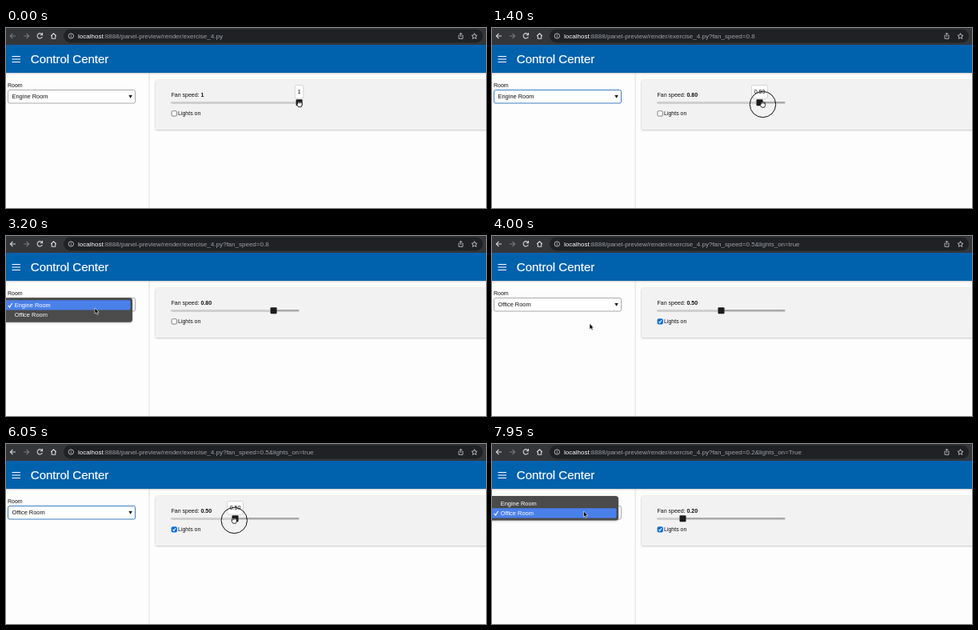
Recreate the animation shown at these times as an HTML page. Size 600 by 225 pixels, loop 8000 ms.

```html
<!DOCTYPE html>
<html lang="en">
<head>
<meta charset="utf-8">
<title>Control Center</title>
<style>
  html, body { margin: 0; width: 100%; height: 100%; overflow: hidden; background: #fdfdfd; }
  svg { display: block; width: 100vw; height: 100vh; }
  text { font: 7px "Liberation Sans", Arial, sans-serif; fill: #111; white-space: pre; }
  .url { font-size: 8.03px; fill: #9aa0a6; }
  .host { fill: #fff; }
  .title { font-size: 15px; fill: #fff; stroke: #fff; stroke-width: 0.2; }
  .choice { font-size: 7.45px; }
  .menu text { font-size: 7.45px; fill: #fff; }
  .bold { font-weight: bold; }
  .icon { fill: none; stroke: #d3d5d9; stroke-width: 1.1; }
  .thin { stroke-width: 0.8; }
  .off { stroke: #77797d; }
</style>
</head>
<body>
<svg viewBox="0 0 600 225" preserveAspectRatio="none">
  <defs>
    <filter id="shadow" x="-5%" y="-20%" width="110%" height="150%">
      <feDropShadow dx="0" dy="0.6" stdDeviation="0.9" flood-opacity="0.28"/>
    </filter>
  </defs>
  <rect width="600" height="225" fill="#fdfdfd"/>

  <!-- page -->
  <path d="M179 56V225" stroke="#dedede"/>
  <rect x="187" y="65" width="420" height="62" rx="2" fill="#f2f2f2" filter="url(#shadow)"/>
  <rect x="-5" y="20" width="610" height="36" fill="#0062ac" filter="url(#shadow)"/>
  <path d="M7.5 35.5H18M7.5 39H18M7.5 42.5H18" stroke="#fff" stroke-width="1.1"/>
  <text class="title" x="30.8" y="44.2">Control Center</text>

  <!-- browser bar -->
  <rect width="600" height="21" fill="#35363a"/>
  <rect x="72" y="1.5" width="524" height="17" rx="8.5" fill="#202124"/>
  <path class="icon" id="back" d="M12 10H5.5M8.5 6.8L5.3 10L8.5 13.2"/>
  <path class="icon off" d="M22 10H28.5M25.5 6.8L28.7 10L25.5 13.2"/>
  <path class="icon" d="M45 8A3.2 3.2 0 1 0 45.3 11M45.5 6V8.8H42.7"/>
  <path class="icon" d="M56.2 10L59.5 6.8L62.8 10M57.3 9.5V13.2H61.7V9.5"/>
  <g class="icon thin">
    <circle cx="81.3" cy="10" r="3.2"/><path d="M81.3 9.6V11.8M81.3 8V8.8"/>
    <path d="M567 9H566V13.3H571V9H570M568.5 11V6.3M566.8 7.8L568.5 6.1L570.2 7.8"/>
    <path d="M585.5 6.6L586.5 9L589 9.2L587.1 10.9L587.7 13.4L585.5 12L583.3 13.4L583.9 10.9L582 9.2L584.5 9Z"/>
  </g>
  <text class="url" x="90" y="13"><tspan class="host">localhost</tspan>:8888/panel-preview/render/exercise_4.py<tspan id="query"></tspan></text>

  <!-- room selector -->
  <text x="2" y="73.8">Room</text>
  <rect id="select" x="2.5" y="77.5" width="159" height="16.5" rx="2" fill="#fff" stroke-width="0.9"/>
  <text class="choice" id="room" x="7.5" y="88.3"></text>
  <path d="M153.4 83.9H157.8L155.6 87.7Z" fill="#111"/>

  <!-- controls -->
  <text x="206.5" y="85.6">Fan speed: <tspan class="bold" id="speed"></tspan></text>
  <rect x="206.5" y="92" width="160" height="2.4" rx="1" fill="#a9a9a9"/>
  <rect id="track" x="206.5" y="92" height="2.4" rx="1" fill="#d0d0d0"/>
  <rect id="knob" y="89.2" width="8" height="8" rx="1" fill="#1c1c1c"/>
  <rect id="box" x="207" y="103.7" width="6.4" height="6.4" rx="1.2" stroke-width="0.8"/>
  <path id="tick" d="M208.5 107L209.8 108.4L212 105.3" fill="none" stroke="#fff" stroke-width="1.1"/>
  <text x="215" y="109.3">Lights on</text>
  <g id="tip">
    <rect id="tipBox" y="71.5" height="16.5" rx="2" fill="#fff" stroke="#ccc" stroke-width="0.8"/>
    <text id="tipText" y="82" text-anchor="middle"></text>
  </g>

  <!-- drop-down list -->
  <g class="menu" id="menu">
    <rect x="-4" y="0" width="162" height="30.5" rx="3.5" fill="#4b4b4b" filter="url(#shadow)"/>
    <rect id="mark" x="-2" width="157.5" height="12.3" rx="2" fill="#4a80ea"/>
    <path id="check" d="M2.8 9.6L4.6 11.8L7.6 6.8" fill="none" stroke="#fff" stroke-width="1.1"/>
    <text x="10.7" y="11.8">Engine Room</text>
    <text x="10.7" y="24.1">Office Room</text>
  </g>

  <!-- pointer -->
  <g id="pointer">
    <circle id="ring" r="16.2" fill="none" stroke="#111"/>
    <path id="arrow" d="M0 0V7.2L1.7 5.7L2.9 8.3L4.2 7.7L3.1 5.2H5.2Z" fill="#000" stroke="#fff" stroke-width="0.6"/>
    <path id="hand" transform="scale(0.88)" d="M-2.6 -2.6Q-2 -3.6 -1.1 -2.9Q-.3 -3.9 .6 -3Q1.5 -3.7 2.2 -2.6Q3.5 -2.8 3.5 -1.4V1L2.5 4.2H-1.7L-3.6 1.2Q-4.3 -.6 -2.6 -.2ZM-.9 -2.6V-.9M.7 -2.6V-.9M2.2 -2.3V-.9" fill="#fff" stroke="#000" stroke-width="0.9"/>
  </g>
</svg>
<script>
const LOOP = 8000, STEP = 50, TRACK_X = 206.5, TRACK_W = 160, ROW_H = 12.3;
const ROOMS = ["Engine Room", "Office Room"];

const el = {};
document.querySelectorAll("[id]").forEach(node => el[node.id] = node);

const show = (node, on) => node.style.display = on ? "" : "none";
const set = (node, attrs) => Object.entries(attrs).forEach(([k, v]) => node.setAttribute(k, v));
const ease = k => k * k * (3 - 2 * k);
const valueAt = x => Math.round((x - TRACK_X) / TRACK_W * 10) / 10;

// Plays the story from the start and stops at the given time.
function stateAt(now) {
  const s = { x: 367, y: 95, speed: 1, lights: "", room: 0 };
  let clock = 0;

  const wait = ms => clock += ms;
  const change = props => { if (now >= clock) Object.assign(s, props); };
  const click = props => { change({ pressed: true }); wait(100); change({ pressed: false, ...props }); };

  // Eased move; sag bends the way downwards.
  function glide(ms, x, y, sag = 0) {
    if (now >= clock) {
      const k = ease(Math.min(1, (now - clock) / ms));
      s.x += (x - s.x) * k;
      s.y += (y - s.y) * k + sag * Math.sin(Math.PI * k);
    }
    clock += ms;
  }

  function drag(x) {
    const begin = clock, before = s.speed;
    glide(700, x, 95.5);
    if (now < begin) return;
    s.speed = valueAt(s.x);
    if (s.lights && s.speed !== before) s.lights = "True";
  }

  wait(400);
  change({ pressed: true, focus: true });
  wait(250);
  drag(338.5);
  wait(350);
  change({ pressed: false });

  glide(1050, 111, 90, 50);
  click({ focus: false, open: true });
  wait(500);
  glide(150, 112, 102.5);
  click({ open: false, room: 1, speed: 0.5, lights: "true" });
  glide(300, 122, 109.5);
  wait(350);

  glide(500, 338, 118, 25);
  glide(300, 289, 97);
  wait(50);
  glide(200, 288, 95.5);
  wait(400);
  change({ pressed: true, focus: true });
  wait(250);
  drag(238.5);
  wait(150);
  change({ pressed: false });

  glide(900, 114.5, 84, 55);
  click({ focus: false, open: true });
  return s;
}

function render(now) {
  const s = stateAt(now);
  const full = s.speed === 1;
  const label = full ? "1" : s.speed.toFixed(2);
  const knobX = TRACK_X + s.speed * TRACK_W;
  const dragging = s.pressed && s.x > 200;
  const hover = dragging || Math.abs(s.x - knobX) < 5.5 && Math.abs(s.y - 93) < 3.6;

  el.query.textContent = full ? "" : `?fan_speed=${s.speed}` + (s.lights && `&lights_on=${s.lights}`);
  el.back.classList.toggle("off", full);
  el.room.textContent = ROOMS[s.room];
  el.speed.textContent = label;
  set(el.select, { stroke: s.focus ? "#2a6fb5" : "#a0a0a0" });
  set(el.track, { width: knobX - TRACK_X });
  set(el.knob, { x: knobX - 4 });
  set(el.box, { fill: s.lights ? "#0b6fdc" : "#fff", stroke: s.lights ? "#0b6fdc" : "#666" });
  show(el.tick, s.lights);

  const tipW = full ? 10.5 : 20;
  show(el.tip, hover);
  set(el.tipBox, { x: knobX - tipW / 2, width: tipW });
  set(el.tipText, { x: knobX });
  el.tipText.textContent = label;

  const top = 77.2 - s.room * ROW_H;
  const row = s.y - top > 3 + ROW_H ? 1 : 0;
  show(el.menu, s.open);
  set(el.menu, { transform: `translate(0 ${top})` });
  set(el.mark, { y: 3 + row * ROW_H });
  set(el.check, { transform: `translate(0 ${s.room * ROW_H})` });

  set(el.pointer, { transform: `translate(${s.x} ${s.y})` });
  show(el.ring, s.pressed);
  show(el.hand, hover);
  show(el.arrow, !hover);
}

const start = performance.now();
function frame() {
  const t = (performance.now() - start) % LOOP;
  render(Math.floor(t / STEP) * STEP);
  requestAnimationFrame(frame);
}
frame();
</script>
</body>
</html>
```
